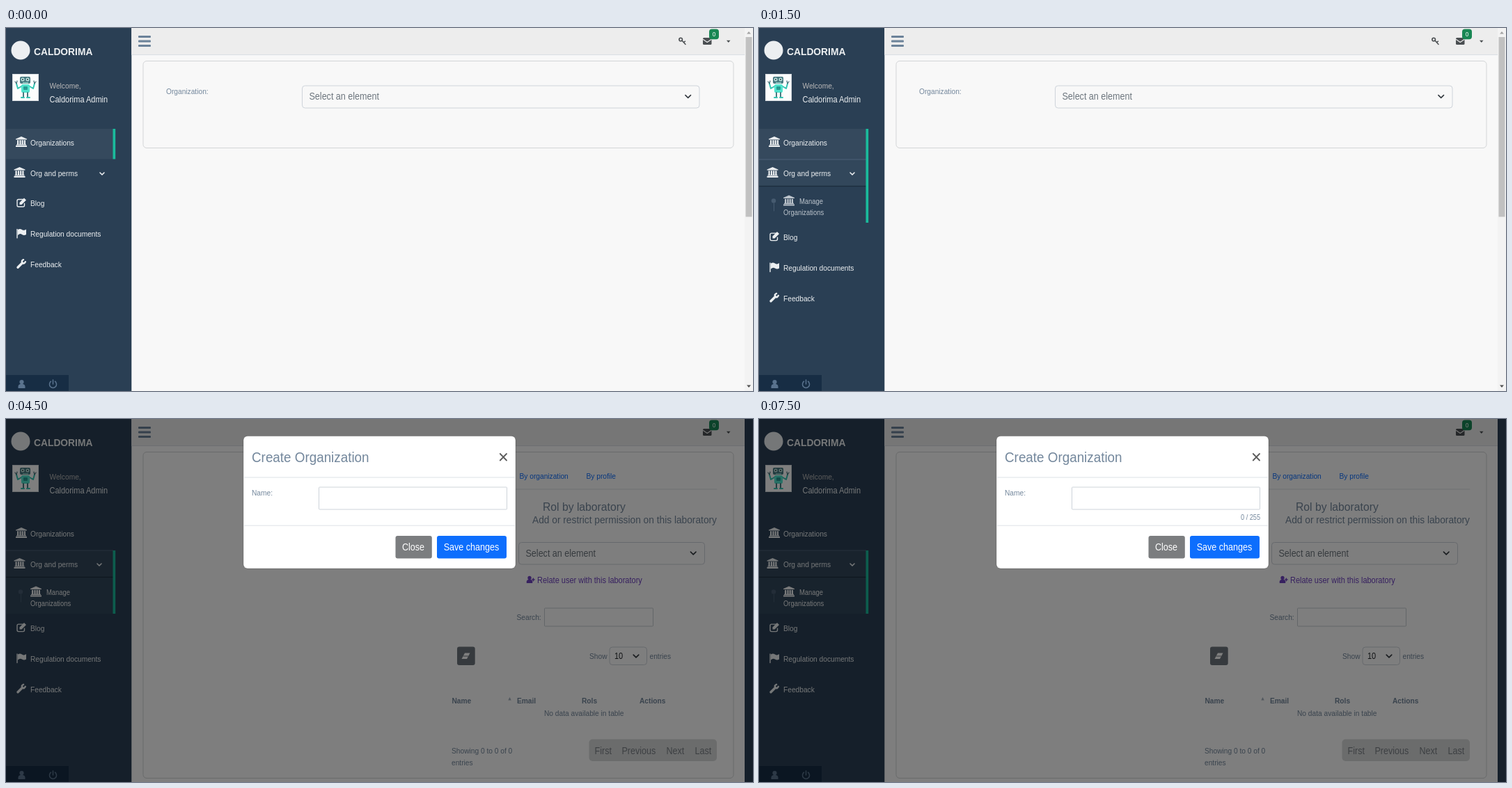
An HTML page for the animation above (8000 ms loop, 1073 by 522 pixels).

```html
<!DOCTYPE html>
<html lang="en">
<head>
<meta charset="utf-8">
<title>Organization manager</title>
<style>
html, body { margin: 0; width: 100%; height: 100%; overflow: hidden; background: #f8f8f8; }
svg { display: block; width: 1073px; height: 522px; }
text { font-family: "Liberation Sans", Arial, sans-serif; }
</style>
</head>
<body>
<svg id="stage" viewBox="0 0 1073 522"></svg>
<script>
const stage = document.getElementById('stage');
const SLATE = '#73879c', BLUE = '#0d6efd', PURPLE = '#6f42c1', NAVY = '#2a3f54', LIGHT = '#eceff1';

// The page is shown at 78.55% width and 86% height.
const text = (x, y, str, size = 13, fill = SLATE, extra = '') =>
  `<text transform="translate(${x} ${y}) scale(.7855 .86)" font-size="${size}" fill="${fill}" ${extra}>${str}</text>`;
const bold = (x, y, str, size, fill) => text(x, y, str, size, fill, 'font-weight="700"');
const rect = (x, y, w, h, fill, r = 0, extra = '') =>
  `<rect x="${x}" y="${y}" width="${w}" height="${h}" rx="${r}" fill="${fill}" ${extra}/>`;
const box = (x, y, w, h, stroke, r = 4, fill = 'none') => rect(x, y, w, h, fill, r, `stroke="${stroke}"`);
const path = (d, fill) => `<path d="${d}" fill="${fill}"/>`;
const line = (d, stroke, width = 1) =>
  `<path d="${d}" fill="none" stroke="${stroke}" stroke-width="${width}" stroke-linecap="round" stroke-linejoin="round"/>`;
const circle = (x, y, r, fill) => `<circle cx="${x}" cy="${y}" r="${r}" fill="${fill}"/>`;
const at = (x, y, body) => `<g transform="translate(${x} ${y})">${body}</g>`;
const chevron = (x, y, color, s = 3.8, w = 1.6) => line(`M${x - s} ${y - s / 2}l${s} ${s}l${s} ${-s}`, color, w);

// Icons, drawn around their own centre
const bank = c => path('M0-7.5L8-4V-3H-8V-4ZM-8 5.5H8V7.5H-8ZM-7 3.8H7V5H-7Z' +
  [-6, -2.6, .6, 3.8].map(x => `M${x}-2.2h2.2v6h-2.2Z`).join(''), c);
const edit = c => line('M3-4.5H-4Q-6-4.5-6-2.5V4Q-6 6-4 6H2.500Q4.500 6 4.500 4V1.500', c, 1.4) +
  path('M-2.500 3V0L4-6.500L7-3.500L.5 3Z', c);
const flag = c => line('M-6-5.500V7', c, 1.4) + path('M-5-5Q-2-7 1-5T7-5.500V2Q4 4 1 2T-5 3Z', c);
const wrench = c => line('M-5 5.500L1.500-1', c, 3.4) +
  line('M3-5.500Q-.5-4 1.500-1Q4 1.200 5.800-2.500', c, 2.5);
const user = c => circle(0, -3, 3.1, c) + path('M-5 6V3Q-4.500 .5-2 0H2Q4.500 .5 5 3V6Z', c);
const power = c => line('M-3-3.800A5 5.200 0 1 0 3-3.800M0-6V0', c, 1.5);

function avatar() {
  return box(9.5, 66.5, 37, 38, '#d8dde1', 0, '#fdfdfd') +
    line('M22 84L17 87L15 80M34 84L39 87L41 80', '#35c4b2', 2) +
    line('M15 80l-2-3M15 80l1-4M41 80l2-3M41 80l-1-4', '#426f78', 1.2) +
    rect(20, 70, 15, 10, '#477981', 2) +
    circle(24, 74, 2.5, '#bfe8e2') + circle(31, 74, 2.5, '#bfe8e2') +
    circle(24, 74, 1, '#25333b') + circle(31, 74, 1, '#25333b') +
    rect(24, 78, 8, 1.500, '#8ecfc7') + rect(22, 81, 12, 12, '#50e3cd', 2) +
    rect(25, 84, 6, 5, '#259c93', 1) +
    line('M25 93V99M31 93V99', '#477981', 2) + line('M22 100H26M30 100H34', '#35c4b2', 2);
}

function sidebar(step) {
  const open = step > 0, managing = step > 1;
  const shift = open ? 48.6 : 0;
  const sub = managing ? '#f2f4f5' : '#bcc4cc';
  const item = (y, icon, label, dx = 22) =>
    at(dx, y - 5.300, icon(LIGHT)) + text(35, y, label, 13, LIGHT);
  let s = rect(0, 0, 180.3, 522, NAVY) +
    circle(21, 32, 13.500, LIGHT) + bold(40, 38.800, 'CALDORIMA', 17.6, LIGHT) + avatar() +
    text(62.500, 87, 'Welcome,', 13, '#bab8b8') +
    text(62.500, 107.300, 'Caldorima Admin', 14, LIGHT);
  if (!managing) s += rect(0, 145, 154, 43.500, '#35495d');
  if (open) {
    s += rect(0, 189, 154, 38, '#32475b') + rect(0, 188.500, 154, 1, '#51657a') +
      rect(0, 226.800, 154, 1.400, '#1c2d3e');
    if (managing) s += rect(0, 228.200, 154, 52, '#31465a');
    s += circle(21, 248.500, 3.200, '#465b70') + line('M21.500 252V263', '#465b70') +
      at(43, 248, bank(sub)) + text(58, 253, 'Manage', 12, sub) + text(35, 268.700, 'Organizations', 12, sub);
  }
  const top = managing ? 189 : 145;
  s += rect(153.500, top, 3.700, (open ? 280 : 188.500) - top, '#1abb9c') +
    item(168.700, bank, 'Organizations') + item(212.700, bank, 'Org and perms', 19.500) +
    chevron(open ? 134 : 138, 209.500, LIGHT, 3, 1.6) +
    at(0, shift, item(256.300, edit, 'Blog') + item(300.200, flag, 'Regulation documents') +
      item(344, wrench, 'Feedback')) +
    rect(0, 499, 90, 23, '#172d44') + at(22.500, 512, user('#5a738e')) + at(67.500, 512, power('#5a738e'));
  return s;
}

function topbar(step) {
  const dark = '#4b4f52';
  let s = rect(180.3, 0, 881, 38.500, '#ededed') + rect(180.3, 38, 881, 1, '#d9dee4');
  for (const y of [11, 17.500, 24]) s += rect(190, y, 18, 3, '#6b8299', 1);
  if (step < 2)
    s += line('M971.500 16.500a2.300 2.300 0 1 1-4.600 0a2.300 2.300 0 1 1 4.600 0', dark, 1.6) +
      line('M971 18L976 23.500M973.500 20.500l2-1.300', dark, 1.5);
  return s + rect(1001, 14, 12.500, 10, dark, 1.500) + line('M1001.500 16.500L1007.200 20.500L1013 16.500', '#ededed', 1.1) +
    rect(1010, 1.500, 14, 14.800, '#198754', 4) + text(1014.800, 12.200, '0', 10.5, '#fff') +
    path('M1035 17.800H1040.500L1037.800 21Z', dark);
}

function select(x, y, w, h) {
  return box(x, y, w, h, '#ced4da') + text(x + 10, y + 20, 'Select an element', 16, '#6c757d') +
    chevron(x + w - 16.300, y + 15.500, '#343a40');
}

function homePage() {
  return box(197, 47.500, 848, 125, '#d3d5d7', 5) + text(230, 95, 'Organization:') +
    select(425.500, 83, 570.500, 32);
}

function permissionsPage() {
  const heads = [[640.500, 'Name'], [734, 'Email'], [827, 'Rols'], [910, 'Actions']];
  const pages = [[845.500, 'First'], [884.500, 'Previous'], [948.500, 'Next'], [989.500, 'Last']];
  return box(197, 47.500, 848, 469, '#d3d5d7', 5) +
    line('M368.500 69.800H375.500M372 66.300V73.300', PURPLE, 2.2) +
    text(378, 74, 'Add organization', 13, PURPLE) +
    line('M640.500 101V66Q640.500 62.500 644 62.500H721Q724.500 62.500 724.500 66V101H1021', '#dee2e6') +
    text(652.500, 86.300, 'By laboratory', 13, '#495057') +
    text(737.500, 86.300, 'By organization', 13, BLUE) + text(833.500, 86.300, 'By profile', 13, BLUE) +
    text(771, 131.500, 'Rol by laboratory', 20) +
    text(756, 149.700, 'Add or restrict permission on this laboratory', 17.5) +
    text(641, 189.700, 'Laboratories:') + select(736.500, 177.500, 267, 31.500) +
    at(752, 231, `<g transform="scale(.85)">${user(PURPLE)}</g>`) +
    line('M755.800 231H759M757.400 229.300V232.700', PURPLE, 1.5) +
    text(763, 235.500, 'Relate user with this laboratory', 14, PURPLE) +
    text(733.500, 289.300, 'Search:') + box(773.500, 272, 156, 26, '#c8cdd2', 1) +
    rect(648, 327.500, 25.700, 26.500, '#6c757d', 3) +
    path('M659 336.500H666.500L662 345H654.500Z', '#fff') + line('M657 341H663.500', '#6c757d', 1) +
    text(838, 345.300, 'Show') + box(867, 328, 53.500, 25.500, '#ced4da') +
    text(874, 345.300, '10', 14, '#212529') + chevron(905, 341, '#343a40') + text(924.500, 345.300, 'entries') +
    heads.map(([x, label]) => bold(x, 409, label)).join('') + path('M721.300 404.500L723.500 400L725.700 404.500Z', '#a5b1bd') +
    text(773, 427, 'No data available in table') +
    text(640, 481, 'Showing 0 to 0 of 0') + text(640, 498.300, 'entries') +
    rect(837.500, 460.500, 183.500, 31.500, '#d7d9da', 5) +
    pages.map(([x, label]) => text(x, 481.500, label, 16, '#7b8086')).join('');
}

function scrollbar() {
  return rect(1061, 0, 12, 522, '#f3f3f3') + rect(1062.500, 13, 9, 258.500, '#c1c1c1') +
    path('M1064 8.500H1070L1067 5Z', '#a3a3a3') + path('M1064 513.500H1070L1067 517Z', '#505050');
}

function modal(counted) {
  return rect(341, 24.500, 391, 190.500, '#fff', 6, 'stroke="#0003"') +
    text(353, 61.500, 'Create Organization', 24) + line('M709.800 50L719 59.500M719 50L709.800 59.500', '#5c5c5c', 1.8) +
    rect(341.500, 83.500, 390, 1, '#dee2e6') + rect(341.500, 152.700, 390, 1, '#dee2e6') +
    text(353, 110.300, 'Name:') + box(449.500, 98, 270, 32, '#ced4da', 1) +
    (counted ? text(692, 145, '0 / 255', 11.7) : '') +
    rect(559.500, 168, 52.300, 32.500, '#7b7d7f', 3) + text(569, 189, 'Close', 16, '#fff') +
    rect(619, 168, 100, 32.500, BLUE, 3) + text(628.700, 189, 'Save changes', 16, '#fff');
}

function scene(step) {
  const dialog = step > 2;
  return rect(0, 0, 1073, 522, step < 2 ? '#f8f8f8' : '#fdfdfd') + sidebar(step) + topbar(step) +
    (step < 2 ? homePage() : permissionsPage()) +
    (dialog ? rect(1061, 0, 12, 522, NAVY) + rect(0, 0, 1073, 522, '#00000080') + modal(step > 3) : scrollbar());
}

const changes = [1500, 3000, 4500, 7500];
let shown = -1;
function play() {
  const time = performance.now() % 8000;
  const step = changes.filter(t => t <= time).length;
  if (step !== shown) stage.innerHTML = scene(shown = step);
  requestAnimationFrame(play);
}
play();
</script>
</body>
</html>
```
